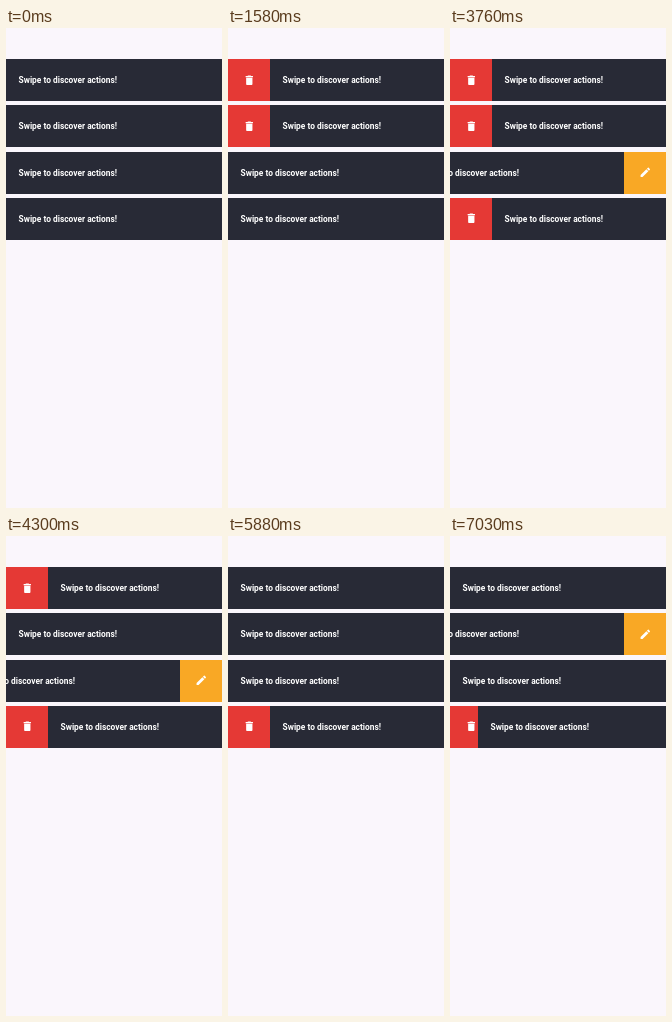
These frames come from a looping animation (216 by 480 pixels, 7060 ms). An HTML page:

```html
<!DOCTYPE html>
<html lang="en">
<head>
<meta charset="utf-8">
<title>Swipe rows</title>
<style>
  html, body { margin: 0; width: 100%; height: 100%; overflow: hidden; background: #faf6fc; }
  .row {
    position: absolute; left: 0; width: 216px; height: 42px; overflow: hidden;
    background: #282a36; color: #fff;
    font: bold 8.4px/42px Roboto, Arial, sans-serif; white-space: nowrap;
  }
  .label { position: absolute; left: 12.6px; top: 0; }
  .action { position: absolute; top: 0; width: 0; height: 42px; overflow: hidden; }
  .delete { left: 0; background: #e53935; }
  .edit { right: 0; background: #f9a825; }
  svg { position: absolute; top: 14.7px; width: 12.6px; height: 12.6px; fill: #fff; }
  .delete svg { left: 14.7px; }
  .edit svg { right: 14.7px; }
</style>
</head>
<body>
<script>
const LOOP = 7060, LAST = 7030, OPEN = 42;
const TRASH = 'M6 19c0 1.1.9 2 2 2h8c1.1 0 2-.9 2-2V7H6v12zM19 4h-3.5l-1-1h-5l-1 1H5v2h14V4z';
const PENCIL = 'M3 17.25V21h3.75L17.81 9.94l-3.75-3.75L3 17.25zM20.71 7.04c.39-.39.39-1.02 0-1.41l-2.34-2.34c-.39-.39-1.02-.39-1.41 0l-1.83 1.83 3.75 3.75 1.83-1.83z';

// Swipes per row: [start ms, side to settle on (1 right, 0 closed, -1 left), duration ms]
const swipes = [
  [[360, 1, 150], [4800, 0, 150]],
  [[1430, 1, 150], [4300, 0, 0], [6450, -1, 150]],
  [[2100, -1, 150], [5730, 0, 150]],
  [[3270, 1, 150], [7011, 0, 150]]
];

const icon = path => `<svg viewBox="0 0 24 24"><path d="${path}"/></svg>`;

const rows = swipes.map((moves, i) => {
  const row = document.createElement('div');
  row.className = 'row';
  row.style.top = 31.2 + i * 46.2 + 'px';
  row.innerHTML = `<div class="label">Swipe to discover actions!</div>
    <div class="action delete">${icon(TRASH)}</div>
    <div class="action edit">${icon(PENCIL)}</div>`;
  document.body.append(row);
  const [label, del, edit] = row.children;
  return { moves, label, del, edit };
});

function offset(moves, t) {
  let x = 0;
  for (const [start, side, duration] of moves) {
    if (t < start) break;
    const p = duration ? Math.min(1, (t - start) / duration) : 1;
    x += (side * OPEN - x) * (1 - (1 - p) ** 3);
  }
  return x;
}

function draw(now) {
  const t = Math.min(now % LOOP, LAST);
  for (const { moves, label, del, edit } of rows) {
    const x = offset(moves, t);
    label.style.transform = `translateX(${x}px)`;
    del.style.width = Math.max(0, x) + 'px';
    edit.style.width = Math.max(0, -x) + 'px';
  }
}

const begin = performance.now();
function tick() {
  draw(performance.now() - begin);
  requestAnimationFrame(tick);
}
tick();
</script>
</body>
</html>
```
